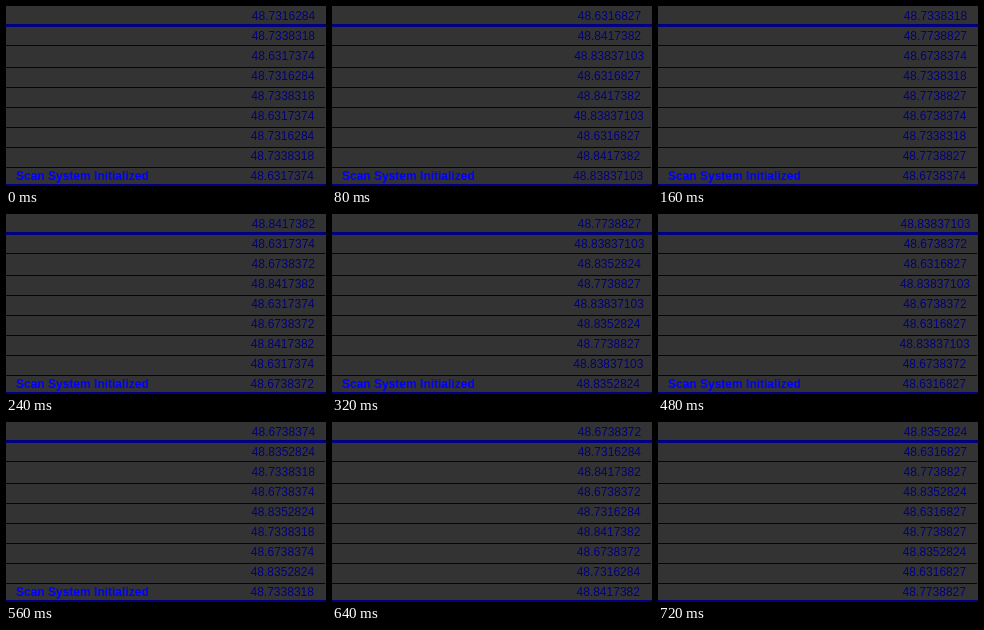
Recreate the animation shown at these times as an HTML page. Size 320 px wide and 180 px high, loop 800 ms.

```html
<!DOCTYPE html>
<html lang="en">
<head>
<meta charset="utf-8">
<title>Scan System</title>
<style>
  html, body { margin: 0; width: 100%; height: 100%; overflow: hidden; background: #333; }
  svg { display: block; width: 100vw; height: 100vh; }
  text { font: 12px "Liberation Sans", Arial, sans-serif; }
  .value { fill: #000080; text-anchor: middle; }
  .status { fill: #00f; font-weight: bold; }
  .rule { fill: #000033; }
  .edge { fill: #000080; }
</style>
</head>
<body>
<svg viewBox="0 0 320 180">
  <rect width="320" height="180" fill="#333"/>
  <rect class="rule" y="39" width="319" height="1"/>
  <g id="rows"></g>
  <rect class="edge" y="18" width="320" height="3"/>
  <rect class="edge" y="178" width="320" height="2"/>
  <text id="status" class="status" x="10" y="174">Scan System Initialized</text>
</svg>
<script>
  const STEP = 80;
  const STATUS_STEPS = 8;
  const ROWS = 9;
  const VALUES = [
    '48.7316284', '48.6316827', '48.7338318', '48.8417382', '48.7738827',
    '48.6317374', '48.83837103', '48.6738374', '48.6738372', '48.8352824'
  ];
  // Every third row shows the same value; the three series run apart
  const OFFSETS = [0, 2, 5];
  const rows = document.getElementById('rows');
  const status = document.getElementById('status');

  function add(tag, attrs) {
    const el = document.createElementNS('http://www.w3.org/2000/svg', tag);
    for (const key in attrs) el.setAttribute(key, attrs[key]);
    return rows.appendChild(el);
  }

  for (let y = 61; y <= 161; y += 20) {
    add('rect', { class: 'rule', y, width: 319, height: 1 });
  }

  const cells = Array.from({ length: ROWS }, (_, r) =>
    add('text', { class: 'value', x: 277.5 - r * 0.16, y: 13.6 + r * 20.05 }));

  function show(step) {
    cells.forEach((cell, r) => {
      cell.textContent = VALUES[(step + OFFSETS[r % 3]) % VALUES.length];
    });
    status.style.visibility = step < STATUS_STEPS ? 'visible' : 'hidden';
  }

  let last = -1;

  function tick() {
    const step = Math.floor(performance.now() / STEP) % VALUES.length;
    if (step !== last) show(last = step);
    requestAnimationFrame(tick);
  }
  tick();
</script>
</body>
</html>
```
